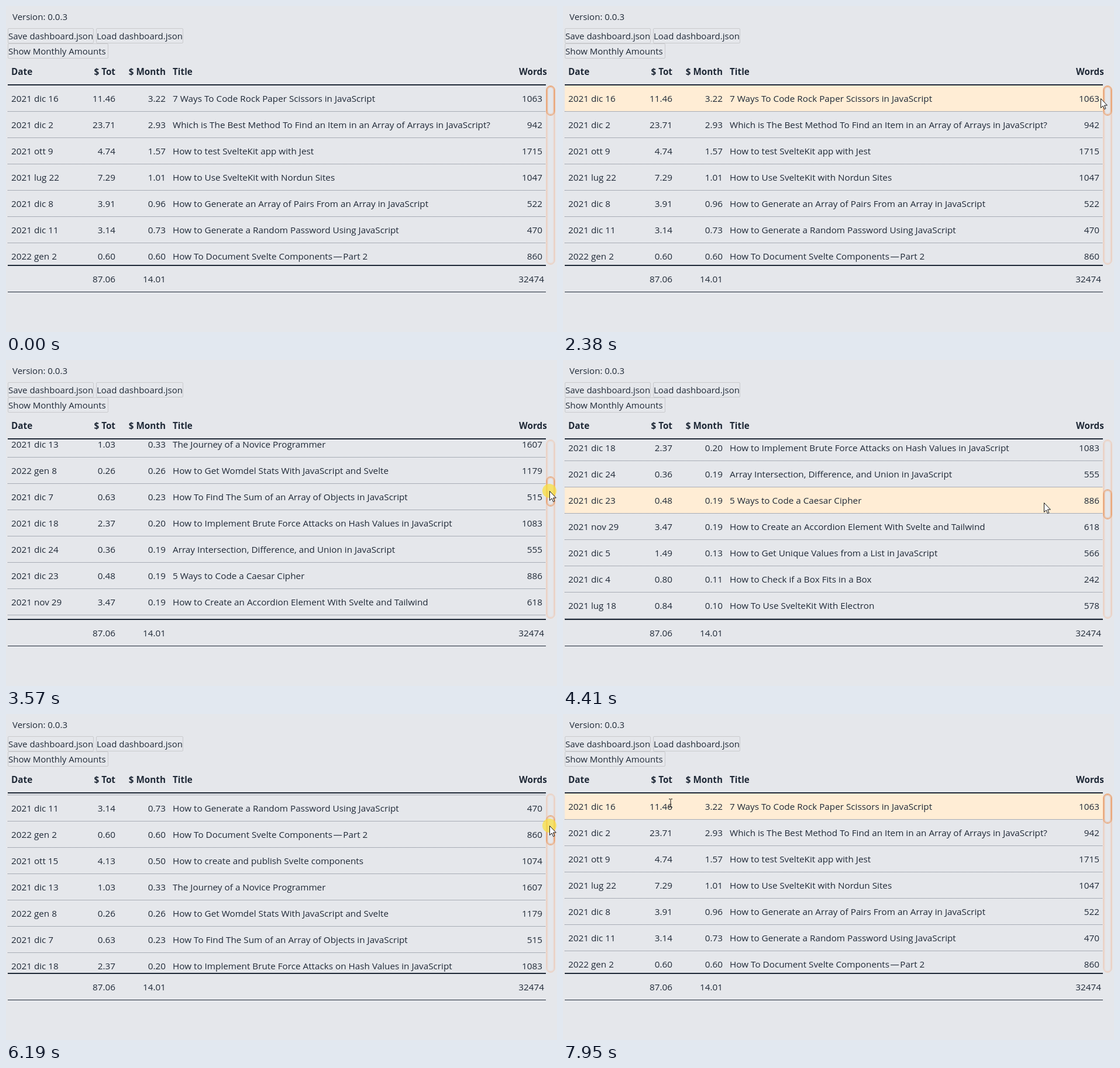
Animation of 942 by 558 pixels, one loop 8 s. Source, as an HTML page:

```html
<!DOCTYPE html>
<html lang="en">
<head>
<meta charset="utf-8">
<title>Dashboard</title>
<style>
  html, body { margin: 0; width: 100%; height: 100%; overflow: hidden; background: #e5e7eb; }
  svg { display: block; }
  text { font: 15.27px "Open Sans", "Noto Sans", sans-serif; fill: #1f2937; }
  .head text { font-weight: 700; }
  .top text { font-size: 15px; }
  .top rect { fill: none; stroke: #c9cacd; }
  .end { text-anchor: end; }
  .rule { fill: #1f2937; }
  .dots { stroke: #6b7280; stroke-dasharray: 1 1; shape-rendering: crispEdges; }
  .ring rect { fill: none; }
</style>
</head>
<body>
<svg id="stage" width="942" height="558" viewBox="0 0 942 558"></svg>
<script>
const LOOP = 8000, STEP = 84;
const TOP = 136, BOTTOM = 443, ROW = 45, RIGHT = 923;
const SCROLL_PER_PX = 5.85, THUMB_RATIO = 5.93;

const rows = `2021 dic 16|11.46|3.22|7 Ways To Code Rock Paper Scissors in JavaScript|1063
2021 dic 2|23.71|2.93|Which is The Best Method To Find an Item in an Array of Arrays in JavaScript?|942
2021 ott 9|4.74|1.57|How to test SvelteKit app with Jest|1715
2021 lug 22|7.29|1.01|How to Use SvelteKit with Nordun Sites|1047
2021 dic 8|3.91|0.96|How to Generate an Array of Pairs From an Array in JavaScript|522
2021 dic 11|3.14|0.73|How to Generate a Random Password Using JavaScript|470
2022 gen 2|0.60|0.60|How To Document Svelte Components\u200a—\u200aPart 2|860
2021 ott 15|4.13|0.50|How to create and publish Svelte components|1074
2021 dic 13|1.03|0.33|The Journey of a Novice Programmer|1607
2022 gen 8|0.26|0.26|How to Get Womdel Stats With JavaScript and Svelte|1179
2021 dic 7|0.63|0.23|How To Find The Sum of an Array of Objects in JavaScript|515
2021 dic 18|2.37|0.20|How to Implement Brute Force Attacks on Hash Values in JavaScript|1083
2021 dic 24|0.36|0.19|Array Intersection, Difference, and Union in JavaScript|555
2021 dic 23|0.48|0.19|5 Ways to Code a Caesar Cipher|886
2021 nov 29|3.47|0.19|How to Create an Accordion Element With Svelte and Tailwind|618
2021 dic 5|1.49|0.13|How to Get Unique Values from a List in JavaScript|566
2021 dic 4|0.80|0.11|How to Check if a Box Fits in a Box|242
2021 lug 18|0.84|0.10|How To Use SvelteKit With Electron|578`
  .split("\n").map(line => line.split("|"));

const label = (x, y, s, cls = "") => `<text x="${x}" y="${y}" class="${cls}">${s}</text>`;
const rule = (y, h) => `<rect class="rule" x="3" y="${y}" width="920" height="${h}"/>`;
const button = (x, y, w, s) =>
  `<rect x="${x + .5}" y="${y + .5}" width="${w - 1}" height="25" rx="1.5"/>` +
  label(x + 1, y + 19, s);

const columns = [[9, ""], [187, "end"], [273, "end"], [285, ""], [917, "end"]];
const tableRow = (cells, i) => {
  const y = TOP + i * ROW;
  return cells.map((s, c) => label(columns[c][0], y + 28, s, columns[c][1])).join("") +
    `<path class="dots" d="M3 ${y + 44.5}H${RIGHT}"/>`;
};

// Nested outlines that fade inward, like an inset shadow
function ring(h, color, peak) {
  let out = "";
  for (let i = 0; i < 5; i++) {
    const alpha = peak * Math.exp(-(((i - .8) / 1.7) ** 2));
    out += `<rect x="${923.5 + i}" y="${TOP + .5 + i}" width="${15 - 2 * i}" height="${h - 1 - 2 * i}"
      rx="${7.5 - i}" stroke="${color}" stroke-opacity="${alpha.toFixed(2)}"/>`;
  }
  return out;
}

const stage = document.getElementById("stage");
stage.innerHTML = `
  <clipPath id="body"><rect x="0" y="${TOP}" width="${RIGHT}" height="${BOTTOM - TOP}"/></clipPath>
  <rect width="942" height="558" fill="#e5e7eb"/>
  <g class="top">
    ${label(11, 24, "Version: 0.0.3")}
    ${button(3, 38, 147, "Save dashboard.json")}
    ${button(154, 38, 149, "Load dashboard.json")}
    ${button(3, 64, 172, "Show Monthly Amounts")}
  </g>
  <g class="head">
    ${label(9, 118, "Date")}${label(187, 118, "$ Tot", "end")}${label(273, 118, "$ Month", "end")}
    ${label(285, 118, "Title")}${label(877, 118, "Words")}
  </g>
  <g clip-path="url(#body)">
    <g id="list">
      <rect id="hover" x="3" width="920" height="44" fill="#ffedd5"/>
      <g id="rows">${rows.map(tableRow).join("")}</g>
    </g>
  </g>
  ${rule(134, 2)}${rule(443, 2)}${rule(489, 1)}
  ${label(187, 473, "87.06", "end")}${label(273, 473, "14.01", "end")}${label(920, 473, "32474", "end")}
  <g class="ring">${ring(307, "#f3b48f", .45)}</g>
  <g class="ring" id="thumb">${ring(52, "#ea9a62", .8)}</g>
  <g id="pointer">
    <circle id="press" r="12" fill="#f8e043" fill-opacity=".75"/>
    <path id="arrow" d="M.5.5V16.4L4.1 12.9 6.6 18.6 8.9 17.6 6.5 12H11.4Z" fill="#fff" stroke="#111" stroke-linejoin="round"/>
    <path id="beam" d="M-3-6.5H-.5M.5-6.5H3M-3 7.5H-.5M.5 7.5H3M0-6V7" fill="none" stroke="#111"/>
  </g>`;

const el = id => document.getElementById(id);
const list = el("list"), hover = el("hover"), thumb = el("thumb"), pointer = el("pointer"),
  press = el("press"), arrow = el("arrow"), beam = el("beam");
const spans = [...el("rows").querySelectorAll("text")];
const show = (node, on) => node.setAttribute("visibility", on ? "visible" : "hidden");
const move = (node, x, y) => node.setAttribute("transform", `translate(${x} ${y})`);

// Mouse: time, x, y
const path = [
  [740, 655, 538], [1390, 538, 220], [2310, 919, 158], [2550, 929, 160],
  [2800, 929, 160], [3070, 929, 180], [3820, 929, 246], [3990, 929, 246],
  [4070, 920, 246], [4410, 822, 244], [4670, 767, 244], [5000, 921, 236], [5250, 929, 239],
  [5500, 929, 239], [6190, 929, 191], [6770, 929, 141], [7020, 929, 141],
  [7100, 913, 146], [7440, 580, 188], [7860, 204, 145], [7950, 184, 152]];

// While the button is down, the scroll follows the distance from "grab"
const drags = [
  { from: 2800, to: 4070, grab: 160 },
  { from: 5500, to: 7100, grab: 153 }];

// Moves in jumps of about one STEP, landing exactly on each key point
function mouseAt(t) {
  const i = path.findIndex(p => p[0] > t);
  if (i < 1) return path[i < 0 ? path.length - 1 : 0].slice(1);
  const [t0, x0, y0] = path[i - 1], [t1, x1, y1] = path[i];
  const n = Math.max(1, Math.round((t1 - t0) / STEP));
  const k = Math.floor((t - t0) / (t1 - t0) * n + 1e-6) / n;
  return [Math.round(x0 + (x1 - x0) * k), Math.round(y0 + (y1 - y0) * k)];
}

function overText(row, x, dy) {
  if (Math.abs(dy - ROW / 2) > 11) return false;
  const n = columns.length;
  return spans.slice(row * n, row * n + n).some(node => {
    const x0 = +node.getAttribute("x"), w = node.getComputedTextLength();
    const left = node.classList.contains("end") ? x0 - w : x0;
    return x >= left && x <= left + w;
  });
}

function draw(t) {
  const [x, y] = mouseAt(t);
  const visible = t >= path[0][0];
  const drag = drags.filter(d => d.from <= t).pop();
  const pulled = drag ? Math.max(0, mouseAt(Math.min(t, drag.to - 1))[1] - drag.grab) : 0;
  const scroll = Math.round(pulled * SCROLL_PER_PX);

  const at = y - TOP + scroll, row = Math.floor(at / ROW);
  const settled = !drag || t >= drag.to + STEP;
  const inside = visible && settled && x < RIGHT && y >= TOP && y < BOTTOM;
  const isBeam = inside && overText(row, x, at - row * ROW);

  move(list, 0, -scroll);
  move(thumb, 0, Math.round(scroll / THUMB_RATIO));
  hover.setAttribute("y", TOP + row * ROW);
  show(hover, inside);
  move(pointer, x, y);
  show(press, drag && t < drag.to);
  show(arrow, visible && !isBeam);
  show(beam, isBeam);
}

const start = performance.now();
function tick() {
  draw((performance.now() - start) % LOOP);
  requestAnimationFrame(tick);
}
tick();
</script>
</body>
</html>
```
